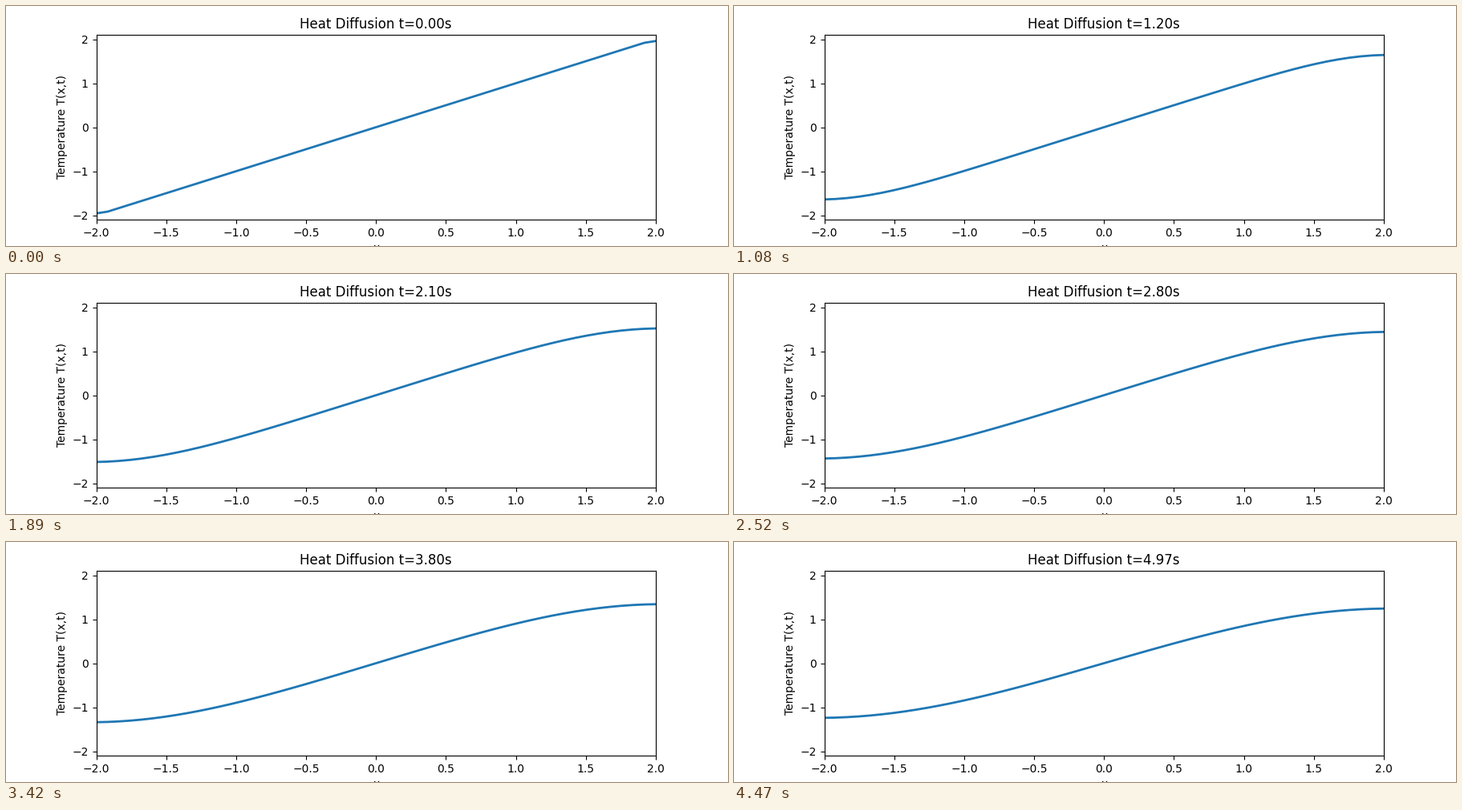
Animation of 900x300 px, one loop 4.5 s. Source, as a matplotlib script:

```python
import numpy as np
import matplotlib.pyplot as plt
from matplotlib.animation import FuncAnimation

FPS = 30
FRAMES = 150
ALPHA = 0.1  # thermal diffusivity

x = np.linspace(-2, 2, 50)
dx = x[1] - x[0]
r = ALPHA / FPS / dx**2


def step(temp):
    """Advance one explicit Euler step with insulated ends."""
    padded = np.pad(temp, 1, mode="edge")
    return temp + r * (padded[2:] - 2 * temp + padded[:-2])


def solve():
    states = [step(x)]
    while len(states) < FRAMES:
        states.append(step(states[-1]))
    return states


states = solve()

fig, ax = plt.subplots(figsize=(9, 3), dpi=100)
line, = ax.plot(x, states[0], lw=2)
ax.set_xlim(-2, 2)
ax.set_ylim(-2.1, 2.1)
ax.set_xlabel("x")
ax.set_ylabel("Temperature T(x,t)")
title = ax.set_title("")


def update(frame):
    line.set_ydata(states[frame])
    title.set_text(f"Heat Diffusion t={frame / FPS:.2f}s")
    return line, title


anim = FuncAnimation(fig, update, frames=FRAMES, interval=30, repeat=True)
plt.show()
```
